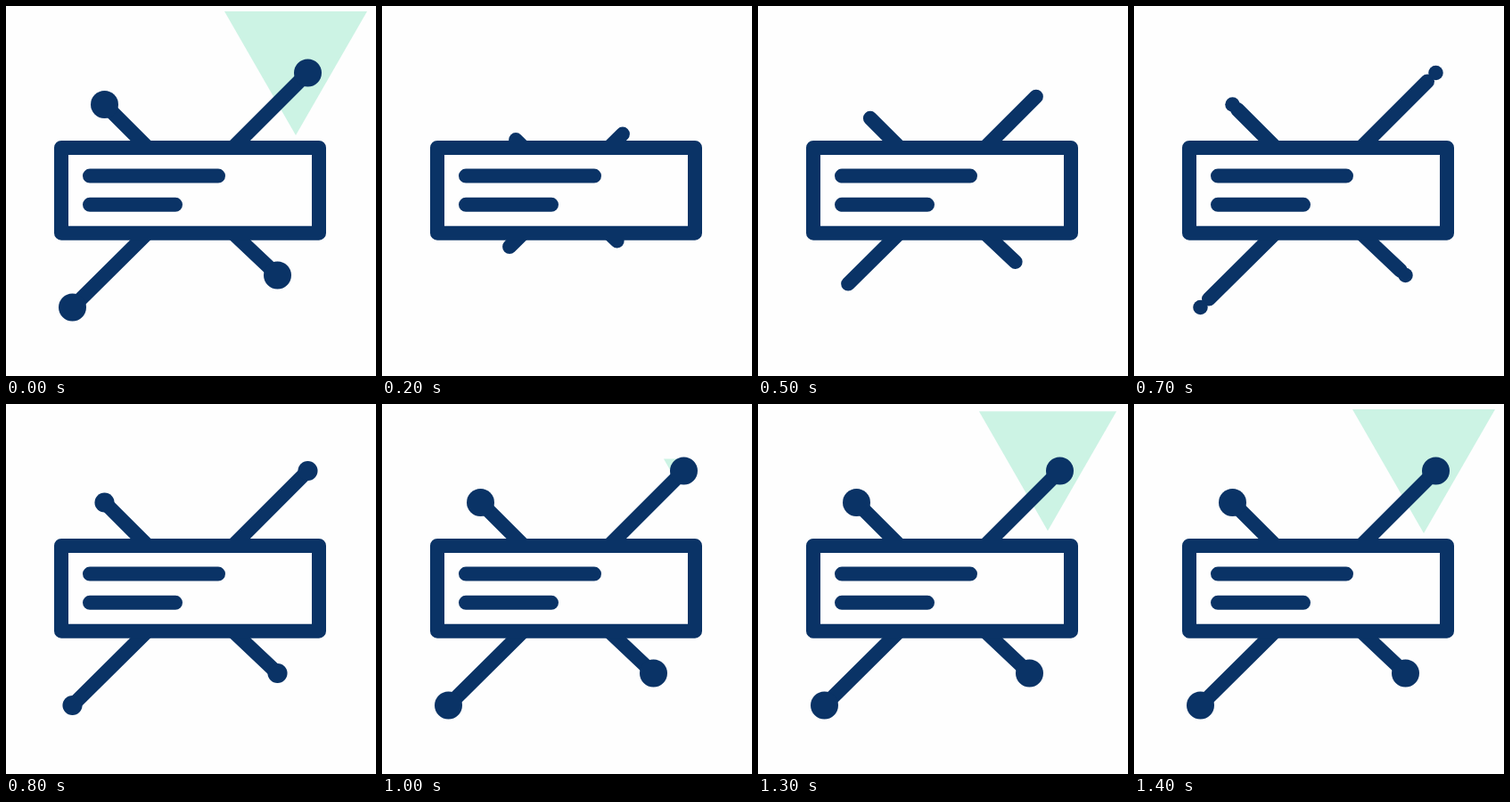
These frames come from a looping animation (415x415 px, 1.5 s). An HTML page:

```html
<!DOCTYPE html>
<html lang="en">
<head>
<meta charset="utf-8">
<title>Connected card</title>
<style>
  html, body { margin: 0; width: 100%; height: 100%; overflow: hidden; background: #fefefe; }
  svg { display: block; width: 100%; height: 100%; }
  .ink { fill: none; stroke: #0a3366; stroke-width: 16; stroke-linecap: round; stroke-linejoin: round; }
</style>
</head>
<body>
<svg viewBox="0 0 415 415">
  <path id="triangle" fill="#ccf3e4" d="M-80 -62.5H80L0 76.5Z"/>
  <g id="arms" class="ink"></g>
  <g id="dots" fill="#0a3366"></g>
  <rect class="ink" x="62" y="159" width="289" height="95.7" style="fill:#fefefe"/>
  <path class="ink" d="M94 190.6H238M94 222.8H190"/>
</svg>
<script>
const LOOP = 1500, STEP = 100, RESET = 200;

// Each arm: start x, start y, end x, end y
const ARMS = [
  [159, 159, 110.5, 110.5],
  [254.5, 159, 338.5, 75],
  [158.5, 254.7, 74.5, 338],
  [254.5, 254.7, 304.5, 302]
];

const byId = id => document.getElementById(id);
const set = (el, attrs) => {
  for (const key in attrs) el.setAttribute(key, attrs[key]);
};
const add = (parent, tag) =>
  parent.appendChild(document.createElementNS('http://www.w3.org/2000/svg', tag));
const progress = (t, from, to) => Math.min(1, Math.max(0, (t - from) / (to - from)));
const easeOut = x => 1 - (1 - x) ** 2;

const triangle = byId('triangle');
const arms = ARMS.map(([x1, y1, x2, y2]) => {
  const line = add(byId('arms'), 'line');
  const dot = add(byId('dots'), 'circle');
  set(line, { x1, y1 });
  set(dot, { cx: x2, cy: y2 });
  return { line, dot, x1, y1, dx: x2 - x1, dy: y2 - y1 };
});

function draw(t) {
  // The finished drawing holds until the loop restarts its build-up.
  if (t < RESET) t = LOOP;
  const grow = easeOut(progress(t, 115, 996));
  const radius = t < 690 ? 0 : 8 + 7.5 * progress(t, 690, 960);
  const scale = progress(t, 960, 1313);

  for (const { line, dot, x1, y1, dx, dy } of arms) {
    set(line, { x2: x1 + dx * grow, y2: y1 + dy * grow });
    set(dot, { r: radius });
  }
  set(triangle, {
    transform: `translate(325 68.5) scale(${scale})`,
    visibility: scale ? 'visible' : 'hidden'
  });
}

let start;
function tick(now) {
  start ??= now;
  const t = (now - start) % LOOP;
  draw(Math.floor(t / STEP) * STEP);
  requestAnimationFrame(tick);
}
draw(0);
requestAnimationFrame(tick);
</script>
</body>
</html>
```
